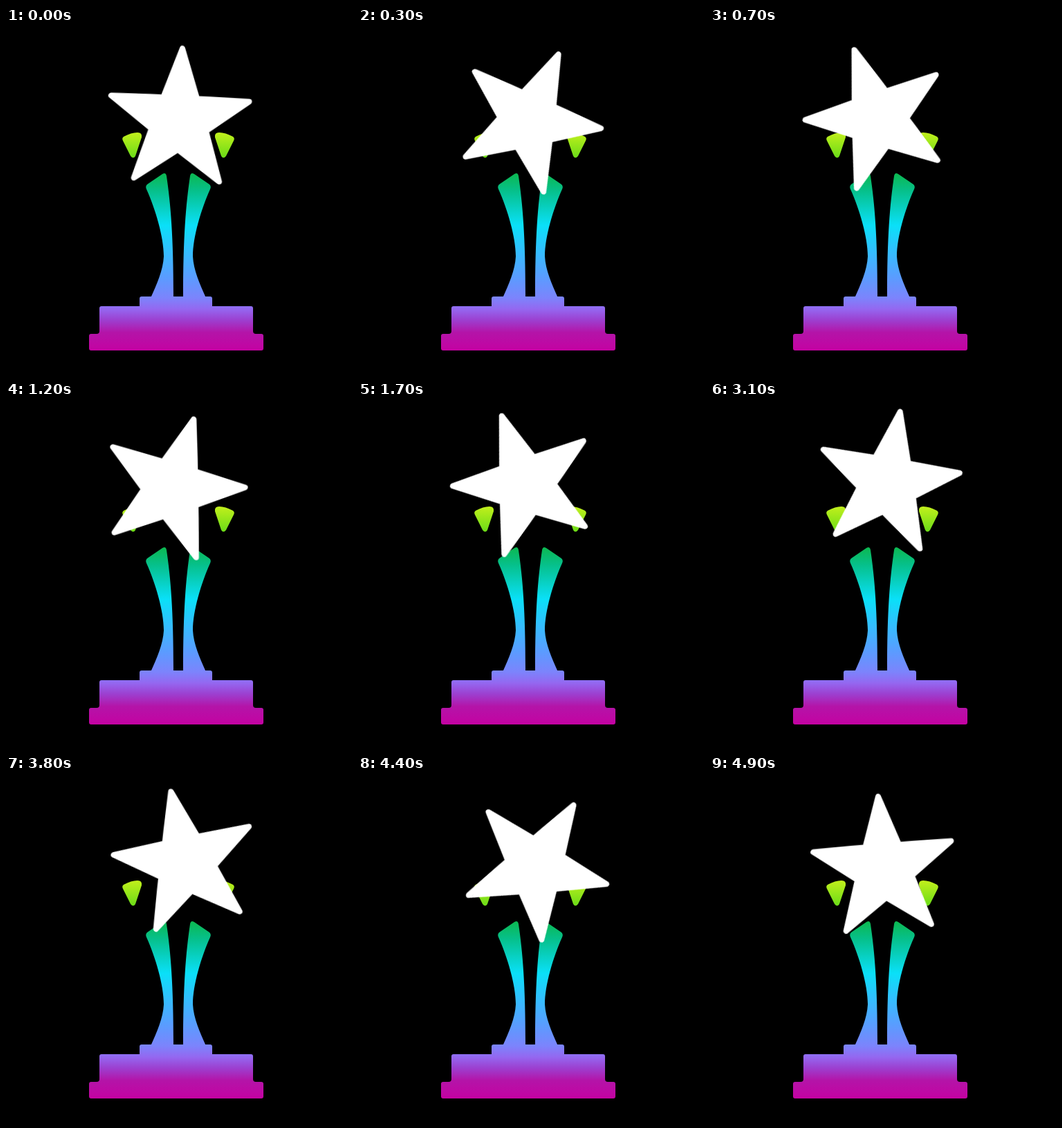
An HTML page that plays this animation: 500 by 500 pixels, repeating every 5 s.

```html
<!DOCTYPE html>
<html lang="en">
<head>
<meta charset="utf-8">
<title>Star trophy</title>
<style>
  html, body { margin: 0; width: 100%; height: 100%; overflow: hidden; background: #000; }
  svg { display: block; width: 100%; height: 100%; }
  #spin { transform-origin: 250.2px 124.7px; }
  #star { fill: #fff; stroke: #fff; stroke-width: 8; stroke-linejoin: round; }
</style>
</head>
<body>
<svg viewBox="0 0 500 500">
  <defs>
    <linearGradient id="hue" gradientUnits="userSpaceOnUse" x1="0" y1="150" x2="0" y2="466"></linearGradient>
    <g id="side">
      <path d="M170 157 Q181 151 190 151 Q197 151 196 158 L187 185 Q184 190 180 185 L169 163 Q167 159 170 157 Z"/>
      <path d="M204 226 L226 211 Q231 208 232 214 C238 255 242 300 242 390 L209 390 C218 370 227 350 228 330 C228 302 216 262 203 233 Q201 229 204 226 Z"/>
    </g>
  </defs>
  <g fill="url(#hue)">
    <use href="#side"/>
    <use href="#side" transform="translate(498 0) scale(-1 1)"/>
    <path d="M196 388 H295 Q298 388 298 391 V402 H354 Q357 402 357 405 V438 Q357 442 361 442 H369 Q372 442 372 445 V463 Q372 466 369 466 H123 Q120 466 120 463 V445 Q120 442 123 442 H131 Q135 442 135 438 V405 Q135 402 138 402 H193 V391 Q193 388 196 388 Z"/>
  </g>
  <g id="spin">
    <polygon id="star" transform="translate(250.2 134.4) rotate(2.6)"/>
  </g>
</svg>
<script>
  const LOOP = 5000, STEPS = 50;
  const $ = id => document.getElementById(id);

  // y position and colour down the trophy
  const hues = [
    [150, "#c4f01c"], [187, "#6cdc18"], [210, "#0cb850"], [235, "#06c08a"],
    [285, "#0ae0f8"], [325, "#36bcff"], [360, "#5a9cff"], [390, "#7c84fc"],
    [406, "#9468f0"], [422, "#9c40d0"], [440, "#b414a8"], [466, "#c402a2"]
  ];
  $("hue").innerHTML = hues
    .map(([y, c]) => `<stop offset="${(y - 150) / 316}" stop-color="${c}"/>`)
    .join("");

  const points = Array.from({ length: 10 }, (_, i) => {
    const r = i % 2 ? 41.5 : 105;
    const a = i * Math.PI / 5;
    return `${r * Math.sin(a)},${-r * Math.cos(a)}`;
  });
  $("star").setAttribute("points", points.join(" "));

  // the pivot sits above the star's centre, so it wobbles as it turns
  $("spin").animate(
    [{ transform: "rotate(0deg)" }, { transform: "rotate(360deg)" }],
    { duration: LOOP, iterations: Infinity, easing: `steps(${STEPS}, end)` }
  );
</script>
</body>
</html>
```
